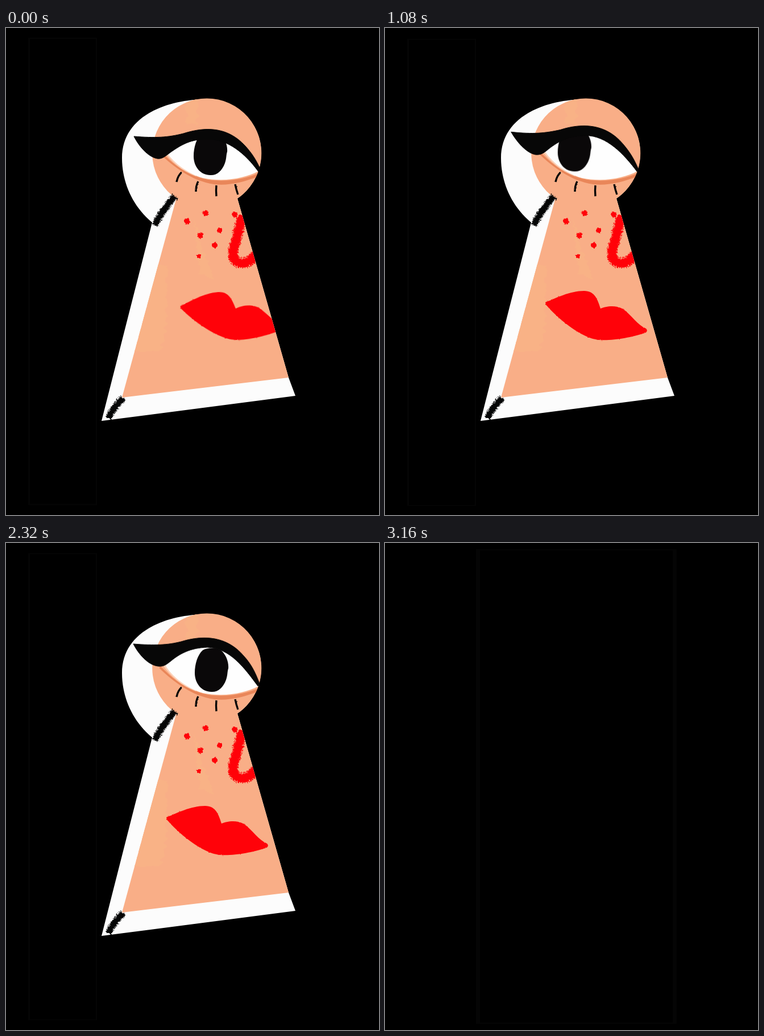
Recreate the animation shown at these times as an HTML page without scripts. Size 656 px wide and 854 px high, loop 3.8 s.

```html
<!DOCTYPE html>
<html lang="en">
<head>
<meta charset="utf-8">
<title>Keyhole</title>
<style>
html, body { margin: 0; width: 100%; height: 100%; overflow: hidden; background: #000; }
svg { position: absolute; left: 0; top: 0; display: block; }
.lid, .pupil, .lips, .door { animation: 3.8s linear infinite; }

.lid { fill: #070707; animation-name: lid; }
@keyframes lid {
  0%, 77%, 100% {
    d: path("M225 190C262 193 285 192 312 185C356 171 392 176 420 206C432 219 440 231 447 247L444 252C420 219 390 196 358 195C325 194 308 205 288 219C278 227 273 230 266 229C250 226 234 208 225 190Z");
    transform: translateY(0);
  }
  44.2% {
    d: path("M220 178C262 183 280 180 306 175C346 162 388 166 416 200C430 216 438 231 445 248L443 252C420 222 390 185 350 185C322 186 306 194 288 208C278 217 273 219 263 218C248 215 231 196 220 178Z");
    transform: translateY(0);
  }
  61%, 66.5% {
    d: path("M224 177C262 180 284 179 308 173C350 160 390 165 418 198C433 214 440 231 446 247L443 251C420 220 394 184 354 183C324 184 306 194 290 207C280 215 276 217 267 216C250 214 233 195 224 177Z");
  }
  61% { transform: translateY(0); }
  66.5% { transform: translateY(-4.5px); }
}

.pupil { fill: #0a0809; animation-name: look; animation-timing-function: ease-in-out; }
@keyframes look {
  0%, 100% { transform: translate(-2px, -3px); }
  15.8%, 26.6% { transform: translate(-30px, -10px); }
  41.5%, 46.5% { transform: translate(29px, 6px); }
  60%, 90% { transform: translate(0, 0); }
}

.lips { fill: #ff0209; transform-origin: 379px 493px; animation-name: smirk; animation-timing-function: ease-in-out; }
@keyframes smirk {
  0%, 83%, 100% { transform: translate(25px, 0) rotate(-4deg); }
  24.2%, 62% { transform: translate(0, 0) rotate(0deg); }
  73.7% { transform: translate(13px, -10px) rotate(1deg); }
}

.door {
  position: absolute; left: 160px; top: 11px; width: 353px; height: 832px;
  box-sizing: border-box; background: #000;
  border: solid #050505; border-width: 2px 7px;
  transform-origin: 0 50%; animation-name: swing;
}
@keyframes swing {
  0%, 73.68% { transform: translateY(0) rotateY(110deg) scaleY(.985); }
  17.9% { transform: translateY(2px) rotateY(110deg) scaleY(.985); }
  83.16%, 100% { transform: translateY(0) rotateY(0deg) scaleY(1); }
}

.core, .hair { fill: none; }
.hair { stroke-dasharray: 1.6 1.2; }
.ink { stroke: #050606; }
.red { stroke: #ff0209; }
</style>
</head>
<body>
<svg width="656" height="854" viewBox="0 0 656 854">
  <defs>
    <filter id="rough" x="-20%" y="-20%" width="140%" height="140%" color-interpolation-filters="sRGB">
      <feTurbulence type="fractalNoise" baseFrequency=".3" numOctaves="2" seed="4"/>
      <feDisplacementMap in="SourceGraphic" scale="6" xChannelSelector="R" yChannelSelector="G"/>
    </filter>
    <filter id="grain" x="-5%" y="-5%" width="110%" height="110%" color-interpolation-filters="sRGB">
      <feTurbulence type="fractalNoise" baseFrequency=".25" numOctaves="2" seed="9"/>
      <feDisplacementMap in="SourceGraphic" scale="2" xChannelSelector="R" yChannelSelector="G"/>
    </filter>
    <filter id="brush" x="-20%" y="-10%" width="140%" height="120%" color-interpolation-filters="sRGB">
      <feTurbulence type="fractalNoise" baseFrequency=".03 .12" numOctaves="2" seed="2"/>
      <feDisplacementMap in="SourceGraphic" scale="16" xChannelSelector="R" yChannelSelector="G"/>
    </filter>
    <path id="skin" d="M299.5 299A96 96 0 1 1 407 299L497 613L204 648Z"/>
    <clipPath id="face"><use href="#skin"/></clipPath>
    <path id="neck" d="M297 295Q277 317 261 346"/>
    <path id="foot" d="M206 649Q190 664 180 684"/>
    <path id="nose" d="M414 334C410 358 402 378 399 392C398 416 424 421 440 396"/>
  </defs>

  <path fill="#fcfcfc" d="M257 341C222 312 204 270 204 228C204 155 282 125 353 125C406 125 449 167 449 218C449 252 432 282 407 299L497 613L509 645L168 689Z"/>
  <use href="#skin" fill="#f9ae87"/>

  <g clip-path="url(#face)">
    <g fill="#f9b286" filter="url(#brush)">
      <path d="M318 120h18v50h-18Z"/>
      <path d="M262 410L284 420L280 540L270 568L226 568Z"/>
      <path d="M330 330L346 390L366 440L340 430Z"/>
    </g>
    <g filter="url(#rough)">
      <use href="#nose" class="core red" stroke-width="14" stroke-linecap="round"/>
      <use href="#nose" class="hair red" stroke-width="19"/>
    </g>
    <g fill="#ff0209" filter="url(#rough)">
      <circle cx="318" cy="339" r="5"/>
      <circle cx="351" cy="325" r="5"/>
      <circle cx="402" cy="327" r="5"/>
      <circle cx="376" cy="355" r="5"/>
      <circle cx="342" cy="364" r="5"/>
      <circle cx="367" cy="381" r="5"/>
      <circle cx="339" cy="400" r="3.6"/>
    </g>
    <g class="lips">
      <path filter="url(#grain)" d="M282 481C300 474 325 461 350 461C369 461 374 476 379 492C388 488 406 485 419 493C433 503 444 521 459 527C463 531 460 535 453 536C435 542 400 549 376 547C345 544 302 508 283 485Z"/>
    </g>
    <path fill="#e98659" d="M270 214C292 238 322 262 362 267C394 270 422 264 446 254L442 261C418 270 392 277 366 274C326 268 296 244 270 220Z"/>
  </g>

  <path fill="#fcd3bb" d="M274 212C290 234 308 250 334 260L340 240L286 206Z"/>
  <path fill="#fefefe" d="M280 213C285 226 312 253 346 263C384 271 422 263 444 251C434 232 424 216 410 203C396 187 378 178 357 178C332 181 315 188 300 196Z"/>
  <path class="pupil" d="M346 188C355 183 371 183 379 189C387 196 392 209 391 220C389 226 390 232 387 240C382 254 372 262 361 261C345 261 332 247 332 228C332 212 337 196 346 188Z"/>
  <path class="lid" d="M225 190C262 193 285 192 312 185C356 171 392 176 420 206C432 219 440 231 447 247L444 252C420 219 390 196 358 195C325 194 308 205 288 219C278 227 273 230 266 229C250 226 234 208 225 190Z" stroke="#070707" stroke-linejoin="round"/>

  <g class="core ink" stroke-width="3.4" filter="url(#grain)">
    <path d="M309 253Q302 259 300 270M338 269Q334 276 334 287M370 276Q369 285 370 295M403 274Q405 284 408 292"/>
  </g>
  <g filter="url(#rough)">
    <use href="#neck" class="core ink" stroke-width="9"/>
    <use href="#neck" class="hair ink" stroke-width="13"/>
    <use href="#foot" class="core ink" stroke-width="9"/>
    <use href="#foot" class="hair ink" stroke-width="13"/>
  </g>
</svg>
<div class="door"></div>
</body>
</html>
```
